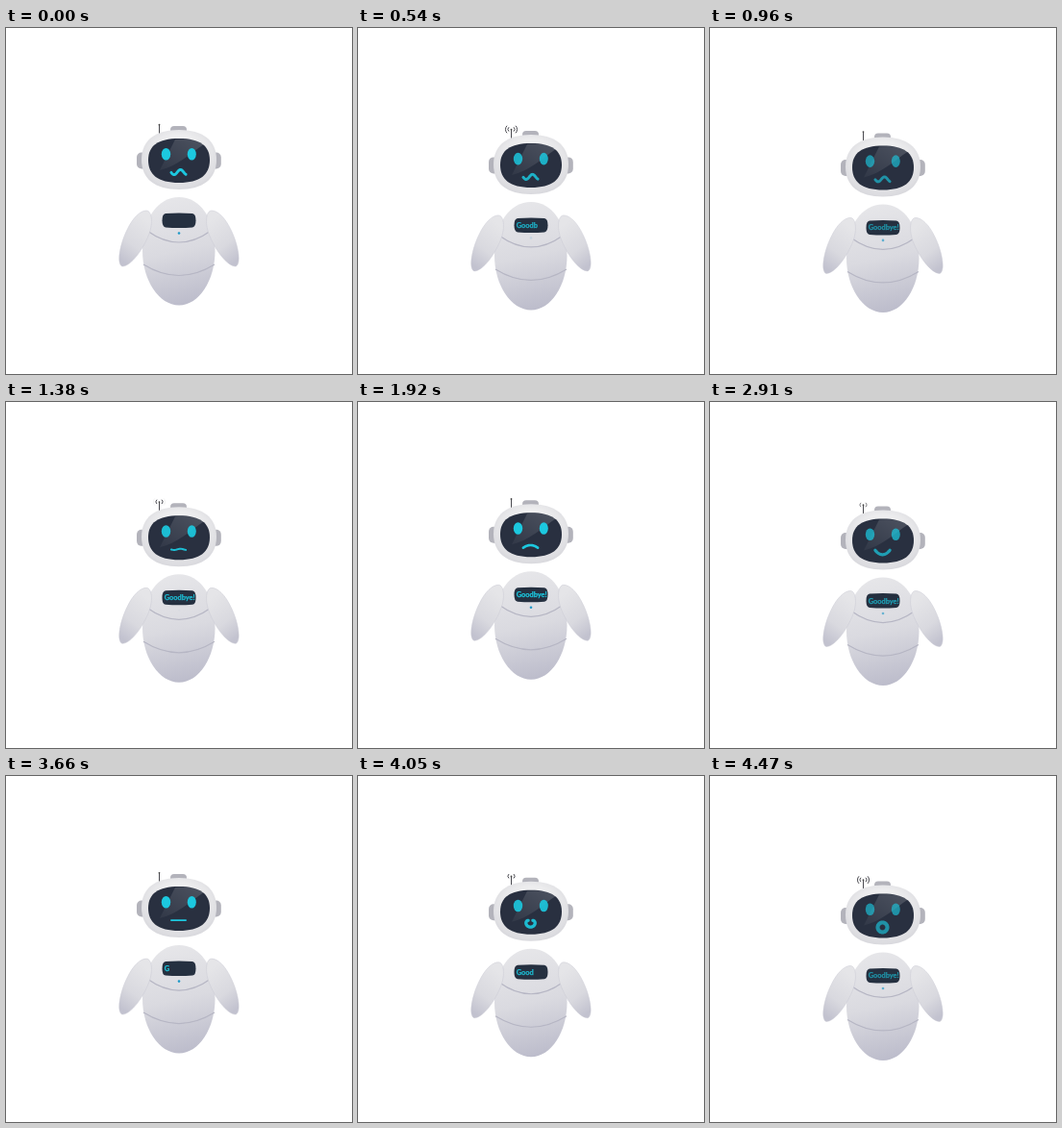
Animation, 360 px wide and 360 px high, one loop 4500 ms. Source, as an HTML page:

```html
<!DOCTYPE html>
<html lang="en">
<head>
<meta charset="utf-8">
<style>
  html, body { margin: 0; height: 100%; overflow: hidden; background: #fff; }
  svg { display: block; width: 100%; height: 100%; }
  text { font: bold 7.4px Lato, Arial, sans-serif; stroke: #1cc8df; stroke-width: .25px; }
</style>
</head>
<body>
<svg viewBox="0 0 360 360">
  <defs>
    <radialGradient id="shell" cx=".5" cy=".42" r=".62">
      <stop offset=".5" stop-color="#efeff0"/>
      <stop offset="1" stop-color="#d6d6db"/>
    </radialGradient>
    <linearGradient id="torso" x1=".4" y1="0" x2=".55" y2="1">
      <stop offset="0" stop-color="#e6e6e9"/>
      <stop offset=".5" stop-color="#dadae0"/>
      <stop offset="1" stop-color="#bcbccb"/>
    </linearGradient>
    <linearGradient id="limb" x1=".7" y1=".1" x2=".3" y2="1">
      <stop offset="0" stop-color="#e5e5e8"/>
      <stop offset=".6" stop-color="#d9d9df"/>
      <stop offset="1" stop-color="#c2c2cf"/>
    </linearGradient>
    <linearGradient id="shine" x1="1" y1="0" x2="0" y2="1">
      <stop offset="0" stop-color="#fff" stop-opacity=".17"/>
      <stop offset="1" stop-color="#fff" stop-opacity=".04"/>
    </linearGradient>
    <path id="arm" d="M146 190C152 190 153 203 149 214C143 230 130 248 121 248C115 246 118 226 126 210C132 197 140 190 146 190Z"
      fill="url(#limb)" stroke="#c9c9d3" stroke-width=".5"/>
  </defs>

  <g id="robot">
    <g fill="none" stroke="#4a4a50">
      <path d="M159.5 100.5V112"/>
      <circle cx="159.5" cy="100.7" r=".9" fill="#444" stroke="none"/>
      <path id="near" d="M157 98.3A3 3 0 0 0 157 102.7M162 98.3A3 3 0 0 1 162 102.7"/>
      <path id="far" d="M155 96.8A5.5 5.5 0 0 0 155 104.4M164 96.8A5.5 5.5 0 0 1 164 104.4"/>
    </g>

    <g fill="#b3b3bb">
      <rect x="171" y="102" width="17" height="10" rx="4"/>
      <rect x="136" y="129.500" width="12" height="17" rx="5"/>
      <rect x="211.800" y="129.500" width="12" height="17" rx="5"/>
    </g>
    <path d="M141 137C141 117 155 106 180 106S219 117 219 137S205 168 180 168S141 157 141 137Z" fill="url(#shell)"/>
    <path d="M148 137.500C148 122.500 158 115 180 115S212 122.500 212 137.500S202 161 180 161S148 152.500 148 137.500Z" fill="#293040"/>
    <path d="M160 148L176 116Q190 114.500 200 117.500L206 121C191 131 178 144 160 148Z" fill="url(#shine)"/>

    <path d="M142 232C142 198 158 176 180 176S217.500 198 217.500 232C217.500 262 201 288.500 180 288.500S142 262 142 232Z" fill="url(#torso)"/>
    <g fill="none" stroke="#b6b6c4" stroke-width="1.200">
      <path d="M147 211Q180 235 213 211"/>
      <path d="M143 246Q180 269 217 246"/>
    </g>
    <use href="#arm"/>
    <use href="#arm" transform="matrix(-1 0 0 1 360 0)"/>
    <path d="M166 193Q180 192 194 193Q197.500 193.500 197.500 200.300Q197.500 207 194 207.500Q180 208.500 166 207.500Q162.500 207 162.500 200.300Q162.500 193.500 166 193Z" fill="#253040"/>

    <g id="lights" fill="#1cc8df">
      <ellipse cx="166.500" cy="131.200" rx="4.700" ry="6.300"/>
      <ellipse cx="193.300" cy="131.200" rx="4.500" ry="6.300"/>
      <path id="mouth" fill="none" stroke="#1cc8df" stroke-linecap="round" stroke-linejoin="round"/>
      <text id="label" x="164.700" y="203"></text>
    </g>
    <circle id="led" cx="180" cy="213.500" r="1.300" fill="#1e98c8"/>
  </g>
</svg>

<script>
const LOOP = 4500, STEP = 30, TAU = 2 * Math.PI;
const el = id => document.getElementById(id);
const [robot, near, far, lights, mouth, label, led] =
  ['robot', 'near', 'far', 'lights', 'mouth', 'label', 'led'].map(el);

// time, wobble, bend (positive smiles), roundness
const MOODS = [
  [0, 1, 0, 0], [900, 1, 0, 0], [1600, 0, 0, 0], [2000, 0, -3, 0], [2480, 0, -3, 0],
  [2800, 0, 4.5, 0], [3200, 0, 4.5, 0], [3600, 0, 0, 0], [3800, 0, 0, 0],
  [4200, 0, 0, 1], [LOOP, 0, 0, 1]
];

const clamp = v => Math.max(0, Math.min(1, v));
const smooth = v => v * v * (3 - 2 * v);
const mix = (a, b, k) => a + (b - a) * k;

function drawMouth(t) {
  const i = MOODS.findIndex(m => m[0] > t);
  const a = MOODS[i - 1], b = MOODS[i];
  const k = smooth((t - a[0]) / (b[0] - a[0]));
  const [wobble, bend, round] = [1, 2, 3].map(n => mix(a[n], b[n], k));
  const points = [];
  for (let n = 0; n <= 32; n++) {
    const u = n / 16 - 1;
    const y = -2.6 * wobble * Math.sin(3.6 * u + 0.6) + bend * (0.5 - u * u);
    const px = mix(7.6 * u, 5 * Math.sin(Math.PI * u), round);
    const py = mix(y, 5 * Math.cos(Math.PI * u), round);
    points.push((179.5 + px).toFixed(2) + ' ' + (150 + py).toFixed(2));
  }
  mouth.setAttribute('d', 'M' + points.join('L'));
  mouth.setAttribute('stroke-width', 1.7 + 1.2 * Math.max(wobble, Math.abs(bend) / 3.5, 2 * round));
}

function draw(now) {
  const t = Math.floor(now % LOOP / STEP) * STEP;
  const drop = (1 - Math.cos(TAU * t / 1800)) / 2;
  const pulse = t % 900 / 900;
  const dim = 1 - 0.36 * drop ** 2;

  robot.setAttribute('transform', `translate(0 ${7.5 * drop})`);
  near.setAttribute('opacity', clamp((pulse - 0.15) / 0.12));
  far.setAttribute('opacity', clamp((pulse - 0.53) / 0.05));
  lights.setAttribute('opacity', dim);
  led.setAttribute('opacity', dim * clamp(0.75 * (1 + Math.cos(TAU * pulse))));
  label.textContent = 'Goodbye!'.slice(0, Math.floor((t % 3600 + 40) / 100));
  drawMouth(t);
  requestAnimationFrame(() => draw(performance.now()));
}
draw(0);
</script>
</body>
</html>
```
